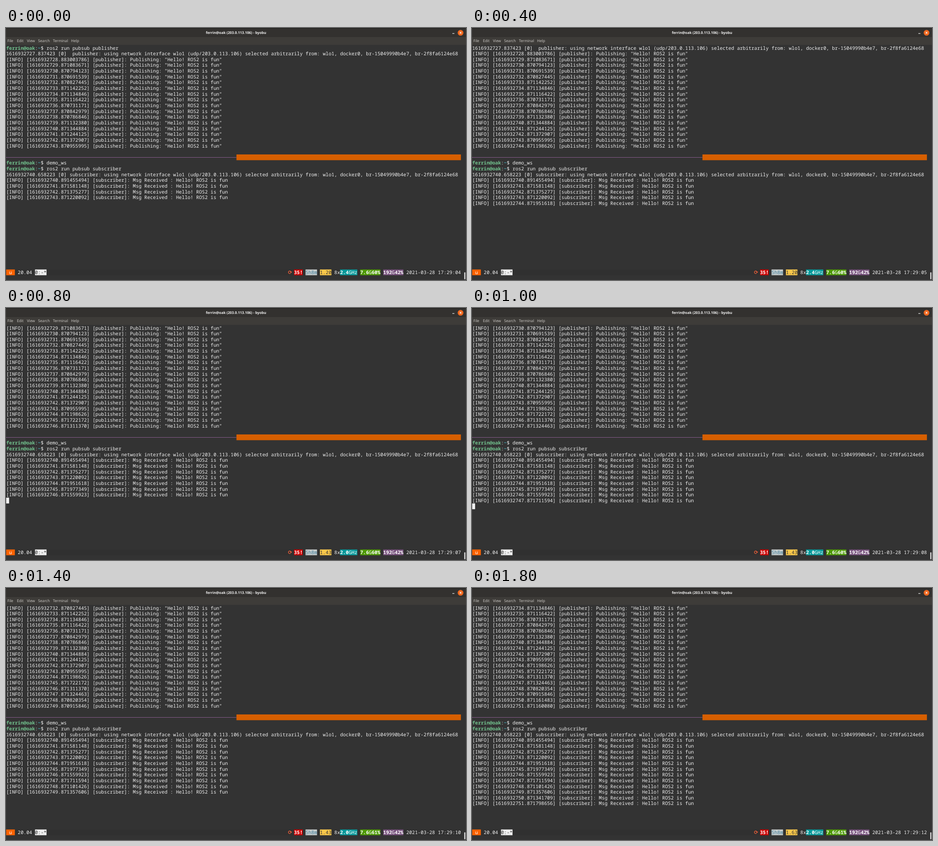
An HTML page with a canvas that plays this animation: 1011 by 554 pixels, repeating every 2 s.

```html
<!DOCTYPE html>
<html lang="en">
<head>
<meta charset="utf-8">
<title>Terminal</title>
<style>
html, body { margin: 0; width: 100%; height: 100%; overflow: hidden; background: #333; }
canvas { display: block; width: 1011px; height: 554px; }
</style>
</head>
<body>
<canvas id="stage" width="1011" height="554"></canvas>
<script>
const ctx = document.getElementById('stage').getContext('2d');
ctx.textRendering = 'geometricPrecision';

const LOOP = 2000, STEP = 200;
const LEFT = 0.5, TOP = 37.7, CELL_W = 6.325, CELL_H = 12.645, BASE = 9.85;
const MONO = '10.54px "Noto Sans Mono", "DejaVu Sans Mono", monospace';
const SANS = '"Open Sans", "Noto Sans", sans-serif';
const FG = '#f0f0f0', BG = '#333333', DARK = '#333333';
const GREEN = '#73c48f', BLUE = '#48b9c7';

const HOST = 'ferrin@oak', ADDRESS = '203.0.113.106';
const EPOCH = 1616932000;
const PUB_START = 728, SUB_START = 740;
const pubTimes = `883003786 871083671 870794123 870691539 870827445 871142252
  871134846 871116422 870731171 870842979 870786846 871132380 871344884 871244125
  871372907 870955995 871198626 871722172 871311370 871324463 870820354 870915846
  871161483 871160080`.split(/\s+/);
const subTimes = `891455494 871581148 871375277 871220092 871951618 871977349
  871559923 871711594 871101426 871357606 871341709 871798656`.split(/\s+/);

const colX = col => LEFT + col * CELL_W;
const rowY = row => TOP + row * CELL_H;

function box(col, row, cols, color) {
  ctx.fillStyle = color;
  ctx.fillRect(colX(col), rowY(row), cols * CELL_W, CELL_H);
}

// Each character sits in its own terminal cell.
function print(col, row, text, color = FG, bold = false) {
  ctx.font = (bold ? 'bold ' : '') + MONO;
  ctx.fillStyle = color;
  ctx.textAlign = 'left';
  for (const ch of text) {
    if (ch !== ' ') ctx.fillText(ch, colX(col), rowY(row) + BASE);
    col++;
  }
}

// Parts wrapped in asterisks-free pairs: [text, bold]
function badge(col, row, bg, fg, ...parts) {
  box(col, row, parts.reduce((sum, [text]) => sum + text.length, 0), bg);
  for (const [text, bold] of parts) {
    print(col, row, text, fg, bold);
    col += text.length;
  }
}

function prompt(row, command) {
  print(0, row, HOST, GREEN, true);
  print(10, row, ':');
  print(11, row, '~', BLUE, true);
  print(12, row, '$ ' + command);
}

const info = (second, fraction, message) =>
  `[INFO] [${EPOCH + second}.${fraction}] ${message}`;

const network = (time, node) =>
  `${time} [0] ${node}: using network interface wlo1 (udp/${ADDRESS}) ` +
  'selected arbitrarily from: wlo1, docker0, br-15049990b4e7, br-2f8fa6124e68';

function drawWindow() {
  ctx.fillStyle = BG;
  ctx.fillRect(0, 0, 1011, 554);
  ctx.fillStyle = '#33312f';
  ctx.fillRect(0, 0, 1011, 20);
  ctx.fillStyle = '#1c1b1a';
  ctx.fillRect(0, 0, 1011, 1);
  ctx.fillStyle = '#3e3c39';
  ctx.fillRect(0, 20, 1011, 17);

  ctx.fillStyle = '#f2f2f2';
  ctx.font = 'bold 7.8px ' + SANS;
  ctx.textAlign = 'center';
  ctx.fillText(`${HOST} (${ADDRESS}) - byobu`, 505.5, 13);

  ctx.fillStyle = '#d3d0cc';
  ctx.font = '8.2px ' + SANS;
  ctx.textAlign = 'left';
  const menu = { File: 3, Edit: 24, View: 46, Search: 70.5, Terminal: 103, Help: 143 };
  for (const name in menu) ctx.fillText(name, menu[name], 31);

  ctx.fillStyle = '#f2f2f2';
  ctx.fillRect(981, 11.5, 4.5, 1.2);
  ctx.fillStyle = '#f0681f';
  ctx.beginPath();
  ctx.arc(999, 10.5, 6.3, 0, Math.PI * 2);
  ctx.fill();
  ctx.strokeStyle = '#ffffff';
  ctx.lineWidth = 1.1;
  ctx.beginPath();
  ctx.moveTo(997.2, 8.7);
  ctx.lineTo(1000.8, 12.3);
  ctx.moveTo(1000.8, 8.7);
  ctx.lineTo(997.2, 12.3);
  ctx.stroke();

  ctx.fillStyle = '#d6d6d6';
  ctx.beginPath();
  ctx.roundRect(1007, 537, 2.6, 15.5, 1.3);
  ctx.fill();
}

function drawPublisher(count) {
  const lines = [
    row => prompt(row, 'ros2 run pubsub publisher'),
    row => print(0, row, network('1616932727.837423', ' publisher')),
    ...pubTimes.slice(0, 16 + count).map((time, i) => row => print(0, row,
      info(PUB_START + i, time, '[publisher]: Publishing: "Hello! ROS2 is fun"')))
  ];
  lines.slice(-18).forEach((draw, row) => draw(row));
}

function drawDivider() {
  ctx.fillStyle = '#885c8d';
  ctx.fillRect(0, 284, colX(80), 1);
  box(80, 19, 78, '#d75f00');
}

function drawSubscriber(count, cursor) {
  prompt(20, 'demo_ws');
  prompt(21, 'ros2 run pubsub subscriber');
  print(0, 22, network('1616932740.658223', 'subscriber'));
  const shown = subTimes.slice(0, 4 + count);
  shown.forEach((time, i) => print(0, 23 + i,
    info(SUB_START + i, time, '[subscriber]: Msg Received : Hello! ROS2 is fun')));
  if (cursor) box(0, 23 + shown.length, 1, '#f2f2f2');
}

function drawStatus(count) {
  const row = 39;
  const load = count < 2 ? '1.20' : count < 7 ? '1.43' : '1.63';
  box(0, row, 158, '#303030');
  badge(0, row, '#fc6200', '#ffffff', [' u ']);
  print(4, row, '20.04');
  badge(10, row, '#eeeeee', DARK, ['0:-*']);

  ctx.font = 'bold 11px "DejaVu Sans", sans-serif';
  ctx.fillStyle = '#f0603a';
  ctx.fillText('⟳', colX(98) - 0.5, rowY(row) + BASE);

  badge(100, row, '#cc0000', '#ffffff', ['35!', true]);
  badge(104, row, '#c6cbcb', '#417f9c', ['5h8m']);
  badge(109, row, '#fac84b', DARK, [load]);
  print(114, row, '8x');
  badge(116, row, '#06989a', '#ffffff', [count < 2 ? '2.4' : '2.0', true], ['GHz']);
  badge(123, row, '#4e9a06', '#ffffff', ['7.6', true], ['G'], [count < 5 ? '60' : '61', true], ['%', true]);
  badge(131, row, '#75507b', '#ffffff', ['192', true], ['G'], ['42', true], ['%', true]);
  print(139, row, '2021-03-28 17:29:' + String(4 + count).padStart(2, '0'));
}

function draw(step) {
  const count = Math.max(0, step - 1);
  const cursor = (step >= 3 && step <= 5) || step === 8;
  drawWindow();
  drawPublisher(count);
  drawDivider();
  drawSubscriber(count, cursor);
  drawStatus(count);
}

let last = -1;
const start = performance.now();
function tick() {
  const step = Math.floor(((performance.now() - start) % LOOP) / STEP);
  if (step !== last) draw(last = step);
  requestAnimationFrame(tick);
}
tick();
</script>
</body>
</html>
```
